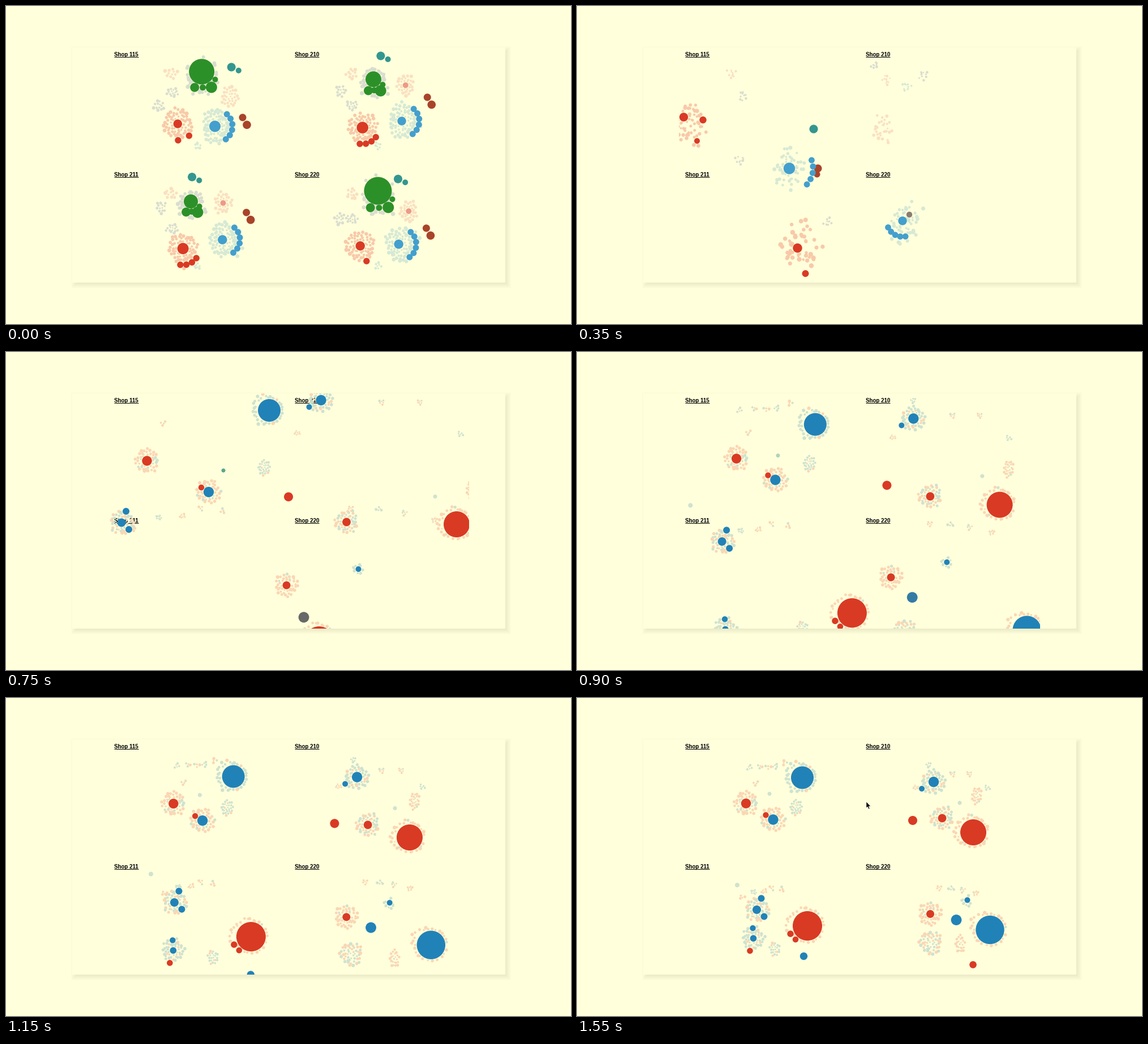
A matplotlib script that plays this animation: 998 px wide and 561 px high, repeating every 2.55 s.

```python
import numpy as np
import matplotlib.pyplot as plt
from matplotlib.animation import FuncAnimation
from matplotlib.colors import to_rgb
from matplotlib.patches import Polygon, Rectangle

W, H, DPI = 998, 561, 64
PT = 72 / DPI
STEP, FRAMES = 50, 51
PAPER = "#ffffdb"
GREEN, RED, SKY, BLUE = "#2c9029", "#d93a24", "#439fcd", "#2182b8"
TEAL, BROWN, PINK, GREY = "#33968f", "#a8442a", "#ec9a86", "#686868"
ROSE, CREAM, MINT, ASH = ["#f8c9a9"], ["#fae0c2"], ["#d6e9d4"], ["#d9ddcf"]
PEACH, AQUA = "#fbd6b4", "#cfe2cf"
WARM = [PEACH] * 5 + [AQUA]
COOL = [AQUA] * 4 + [PEACH]
MIXED = [PEACH, AQUA]
CENTERS = [np.array((345 + 319 * col, 169 + 212 * row)) for row in (0, 1) for col in (0, 1)]


def polar(center, angle, dist):
    a = np.radians(angle)
    return np.array(center) + dist * np.array((np.cos(a), np.sin(a)))


def fan(center, dist, first, last, n):
    """n points spread evenly on an arc."""
    return [polar(center, first + (last - first) * (i + 0.5) / n, dist) for i in range(n)]


class Scene:
    """Dots and swarms that glide from a start (at t0) to an end (at t1)."""

    def __init__(self, t0, t1, tau=150, loose=1.0, jitter=0.0, fill=0.65):
        self.t0, self.t1, self.tau = t0, t1, tau
        self.loose, self.jitter, self.fill = loose, jitter, fill
        self.dots, self.swarms = [], []

    def dot(self, color, r, start, end=None, old=None):
        end = start if end is None else end
        rgb = np.array(to_rgb(color))
        old_rgb = np.array(to_rgb(old or color))
        self.dots.append((np.array(start), np.array(end), self.tau, r, rgb, old_rgb))

    def swarm(self, tints, n, rx, ry, start, end=None, core=0.0):
        """n pale dots on a sunflower spiral, larger outside, with an open core."""
        end = start if end is None else end
        rng = np.random.default_rng(len(self.swarms) + 7)
        rank = (np.arange(n) + 0.5) / n
        angle = np.arange(n) * 2.39996 + rng.uniform(0, 6.28)
        reach = np.sqrt(core + (1 - core) * rank)
        reach *= 0.93 + 0.08 * np.sin(3 * angle + rng.uniform(0, 6.28))
        unit = np.c_[np.cos(angle), np.sin(angle)] * reach[:, None]
        unit += rng.normal(0, 0.03 + self.jitter, (n, 2))
        r = np.sqrt(self.fill * rx * ry * (1 - core) / n)
        r = np.clip(r * (0.65 + 0.5 * rank + rng.uniform(-0.15, 0.15, n)), 1.2, 4.2)
        rgb = np.array([to_rgb(c) for c in rng.choice(tints, n)])
        self.swarms.append((np.array(start), np.array(end), self.tau, unit * (rx, ry), r, rgb))

    def left(self, t, tau):
        """Share of the way still to go; decays exponentially."""
        rest = np.exp(-(self.t1 - self.t0) / tau)
        return (np.exp(-(t - self.t0) / tau) - rest) / (1 - rest)

    def state(self, t):
        fade = np.clip((t - self.t0) / 200, 0, 1)
        spread = 1 + (self.loose - 1) * np.clip((self.t1 - t) / (self.t1 - self.t0), 0, 1.2)
        xy = np.vstack([b + (a - b) * self.left(t, tau) + off * spread
                        for a, b, tau, off, _, _ in self.swarms])
        r = np.concatenate([s[4] for s in self.swarms])
        rgb = np.vstack([s[5] for s in self.swarms])
        big = [(b + (a - b) * self.left(t, tau), size, old + (new - old) * fade)
               for a, b, tau, size, new, old in self.dots]
        # Pale dots are pushed off the large ones.
        for center, size, _ in big:
            away = xy - center
            dist = np.maximum(np.hypot(*away.T), 0.1)
            need = size + r + 0.6
            hit = dist < need
            xy[hit] = center + away[hit] * (need / dist)[hit, None]
        return (np.vstack([xy, [b[0] for b in big]]),
                np.r_[r, [b[1] for b in big]],
                np.vstack([rgb, [b[2] for b in big]]))


def settled():
    """The same ring of groups in every panel, turned by a panel's own spin."""
    s = Scene(0, STEP)
    green_r, red_r, blue_r = (22.5, 14, 12.5, 24.5), (7.7, 10.3, 10, 8.2), (10, 7.7, 8.2, 8.2)
    for k, (center, spin) in enumerate(zip(CENTERS, (0, -25, -31, -12))):
        def group(angle, dist, turn=1.0):
            return polar(center, angle + turn * spin, dist)

        green, red, blue = group(-89, 37), group(137, 57, 0.4), group(58, 51, 0.65)
        cream, brown, teal = group(-10, 51), group(24, 84), group(-49, 81, 1.7)
        s.swarm(ASH, 46, 24, 25, green)
        s.swarm(ROSE, 62, 28, 29, red, core=0.06)
        s.swarm(MINT, 74, 28, 33, blue, core=0.06)
        s.swarm(CREAM, 33, 17, 20, cream)
        s.swarm(CREAM, 11, 12, 11, group(223, 73, 0))
        s.swarm(ASH, 15, 12, 9, group(198, 53))
        s.swarm(ASH, 13, 10, 12, group(175, 75, -0.8))
        s.swarm(MINT, 7, 7, 7, group(95, 78, 0))

        hub = green + (0, 1.2 * (9 - green_r[k]))
        s.dot(GREEN, green_r[k], hub)
        for i, r in enumerate((5, 10, 5.5, 8)):
            s.dot(GREEN, r, polar(hub, 30 + 28 * i, green_r[k] + r))
        s.dot(RED, red_r[k], red)
        for p in fan(red, 29, 25, 110, (2, 4, 4, 1)[k]):
            s.dot(RED, 5.7, p)
        s.dot(SKY, blue_r[k], blue - (3, 0))
        for p in fan(blue, 28, -60, 65, 6):
            s.dot(SKY, 5.5, p)
        s.dot(TEAL, 7.5, teal)
        s.dot(TEAL, 5, polar(teal, 25, 14))
        s.dot(BROWN, 6.5, polar(brown, 240, 7.5))
        s.dot(BROWN, 7.3, polar(brown, 60, 7.5))
        if k:
            s.dot(PINK, 5, cream)
    return s


def scattered():
    s = Scene(150, 350, loose=1.75, jitter=0.18, fill=0.5)
    s.swarm(ROSE, 52, 25, 36, (213, 228), (201, 208))
    s.swarm(ROSE, 46, 33, 40, (425, 430), (393, 423))
    s.swarm(ROSE, 26, 22, 18, (515, 112), (490, 40))
    s.swarm(MINT, 58, 25, 34, (382, 268), (374, 288))
    s.swarm(MINT, 48, 24, 34, (622, 345), (580, 383))
    s.swarm(CREAM, 30, 17, 22, (510, 190), (539, 216))
    for tint, start, end in (
            (CREAM, (273, 102), (272, 119)), (CREAM, (578, 112), (546, 130)),
            (ASH, (290, 220), (292, 157)), (ASH, (190, 117), (288, 272)),
            (ASH, (597, 119), (612, 121)), (ASH, (481, 378), (442, 381)),
            (ASH, (484, 88), (526, 105)), (MINT, (592, 171), (583, 143))):
        s.swarm(tint, 10, 8, 9, start, end)

    s.dot(RED, 7.7, (208.5, 227), (188.5, 196))
    s.dot(RED, 6.2, (197.5, 202), (222.5, 201))
    s.dot(RED, 5, (165, 265), (212, 238))
    s.dot(RED, 8.2, (457.5, 431.5), (389.5, 427))
    s.dot(RED, 6, (397.5, 357), (403.5, 472))
    s.dot(TEAL, 7.5, (429.5, 190), (418, 217))
    s.dot(BROWN, 5.5, (520, 262), (424, 297))
    s.dot(BROWN, 7, (530.5, 261), (425.5, 286.5))

    # Two blue hubs, each with satellites that swing round it
    for r, start, end, fan0, fan1 in (
            (10.2, (401.5, 287), (375, 286.5), (85, 210, 145), (42, -28, 50)),
            (7.7, (615.5, 363), (575, 379), (46, 255, 195), (28, 165, 70))):
        s.dot(SKY, r, start, end)
        for a, b in zip(fan(start, *fan0, 5), fan(end, *fan1, 5)):
            s.dot(SKY, 5.4, a, b)
    s.dot("#8a7c72", 5.2, (579, 355), (587, 368), old="#e8806a")

    # Dots hurled off the stage
    for color, r, x, y, hub in (
            (GREEN, 15, 809, 313, CENTERS[3]), (GREEN, 5, 778, 295, CENTERS[3]),
            (GREEN, 9.7, 541, 429, CENTERS[3]), (GREEN, 8.2, 630, 443, CENTERS[3]),
            (GREEN, 5.7, 612, 465.5, CENTERS[3]),
            (RED, 10.5, 523.5, 84, (500, 200)), (RED, 6.2, 438, 98, (500, 200)),
            (RED, 4, 445, 72, (500, 200))):
        p = np.array((x, y))
        s.dot(color, r, p, p + 1.5 * (p - hub))
    for y in (255, 361):
        s.swarm(ASH, 8, 9, 11, (797, y), (890, y))
    return s


def regrouped():
    s = Scene(750, 1550)

    def leader(color, r, tints, start, end, moons=(), old=None):
        """A large dot inside its swarm, with moons as (colour, radius, dx, dy)."""
        start, end = np.array(start), np.array(end)
        reach = 18.5 + 0.48 * r
        shift = np.array((-0.45, -0.2)) * max(r - 9, 0)
        s.swarm(tints, int(50 - 0.8 * r), reach, reach, start + shift, end + shift,
                core=(r / reach) ** 2)
        s.dot(color, r, start, end, old)
        for tone, size, dx, dy in moons:
            s.dot(tone, size, start + (dx, dy), end + (dx, dy))

    def minis(k, first, last, n):
        """Little swarms on an arc, blown outwards from the panel's centre."""
        rng = np.random.default_rng(k + 3)
        for i, p in enumerate(fan(CENTERS[k], 1, first, last, n)):
            end = CENTERS[k] + (p - CENTERS[k]) * rng.uniform(32, 68)
            s.swarm((WARM, COOL, MIXED)[i % 3], rng.integers(4, 9), 6, 5,
                    CENTERS[k] + 2.3 * (end - CENTERS[k]), end)

    s.tau = 140
    leader(RED, 8.7, WARM, (249, 192), (298.5, 186))
    leader(BLUE, 9.2, WARM, (358, 247), (346.5, 214.5), [(RED, 5.2, -13, -8)])
    leader(BLUE, 20, COOL, (465, 103), (398, 140.5))
    s.swarm(COOL, 28, 12, 15, (456, 204), (387, 193))
    s.dot(AQUA, 3.5, (384, 209), (340, 169), old="#58a68c")
    minis(0, 205, 300, 6)

    s.tau = 215
    leader(BLUE, 9.2, COOL, (556.5, 85), (630, 148), [(BLUE, 5, -21, 12)])
    leader(RED, 7.4, MIXED, (601.5, 300), (645, 212))
    leader(RED, 23, WARM, (796, 304), (700, 237))
    s.swarm(WARM, 26, 10, 17, (822, 243), (706, 173))
    s.dot(RED, 8, (499, 255.5), (593, 216))
    s.dot(AQUA, 3.5, (758, 255), (676, 185))
    minis(1, 170, 370, 5)

    s.tau = 260
    leader(BLUE, 7.5, COOL, (204, 301), (317.5, 373.5),
           [(BLUE, 6, 8, -20), (BLUE, 6, 13, 12)])
    leader(BLUE, 5.8, COOL, (220, 545), (311.5, 424),
           [(BLUE, 5.2, -1, -18), (RED, 5.3, -6, 22)])
    leader(RED, 26, WARM, (553, 510), (407, 402),
           [(RED, 5.7, -30, 14), (RED, 5.3, -21, 24)])
    s.swarm(COOL, 22, 10, 14, (440, 525), (349, 443))
    s.dot(BLUE, 6.7, (580, 640), (400.5, 455.5))
    s.dot(AQUA, 4, (130, 220), (283, 330))
    minis(2, 200, 300, 5)

    leader(RED, 7, WARM, (495.5, 411.5), (624, 381))
    leader(BLUE, 25.2, WARM, (850, 560), (729.5, 409))
    s.swarm(MIXED, 48, 22, 22, (540, 545), (625, 432))
    s.swarm(WARM, 22, 9, 18, (730, 580), (677, 434))
    s.swarm(COOL, 9, 9, 9, (622, 383), (688, 360))
    s.dot(BLUE, 9.4, (526, 468), (670, 391.5), old=GREY)
    s.dot(BLUE, 5, (622.5, 383), (689.5, 356.5))
    s.dot(RED, 6.3, (740, 640), (699.5, 470.5))
    minis(3, 230, 330, 4)
    return s


fig = plt.figure(figsize=(W / DPI, H / DPI), dpi=DPI, facecolor=PAPER)
ax = fig.add_axes([0, 0, 1, 1])
ax.set(xlim=(0, W), ylim=(H, 0))
ax.axis("off")

# Card with a soft shadow to the lower right
for grow in range(-4, 7):
    ax.add_patch(Rectangle((121 - grow, 77 - grow), 765 + 2 * grow, 415 + 2 * grow,
                           color="#40300a", alpha=0.009, lw=0))
ax.add_patch(Rectangle((117, 73), 765.5, 415, color=PAPER, lw=0))

for (cx, cy), number in zip(CENTERS, (115, 210, 211, 220)):
    x, y = cx - 154, cy - 80.3
    ax.text(x, y, f"Shop {number}", family="Liberation Sans", weight="bold",
            size=9.7 * PT, color="black", va="baseline", zorder=3)
    ax.plot([x, x + 43], [y + 1.5] * 2, color="black", lw=PT,
            solid_capstyle="butt", zorder=3)

bubbles = ax.scatter([], [], lw=0, zorder=4)
bubbles.set_clip_path(Rectangle((180, 73), 638, 415, transform=ax.transData))

ARROW = np.array([(0, 0), (0, 11), (2.4, 8.8), (4.2, 13), (6, 12.2), (4.3, 8.2), (7.6, 8)])
arrow = ax.add_patch(Polygon(ARROW, fc="black", ec="white", lw=0.6, zorder=6))
BEAM = np.array([(-3.5, -6), (0, -5), (3.5, -6), (0, -5), (0, 5), (-3.5, 6), (0, 5), (3.5, 6)])
beam, = ax.plot([], [], color="#202020", lw=1.1 * PT, zorder=6)

before, during, after = settled(), scattered(), regrouped()


def draw(i):
    t = min(i * STEP, 1550)
    scene = before if t < 50 else during if t < 600 else after
    xy, r, rgb = scene.state(t)
    bubbles.set_offsets(xy)
    bubbles.set_sizes((2 * r * PT) ** 2)
    bubbles.set_facecolors(rgb)

    move = np.clip((t - 1300) / 200, 0, 1)
    pointer = np.array((525, 100)) * (1 - move) + np.array((511, 183)) * move
    beam.set_data(*(BEAM + pointer).T)
    beam.set_visible(1250 <= t < 1350)
    arrow.set_xy(ARROW + pointer)
    arrow.set_visible(t >= 1350)
    return bubbles, beam, arrow


anim = FuncAnimation(fig, draw, frames=FRAMES, interval=STEP, repeat=True, repeat_delay=0)
plt.show()
```
